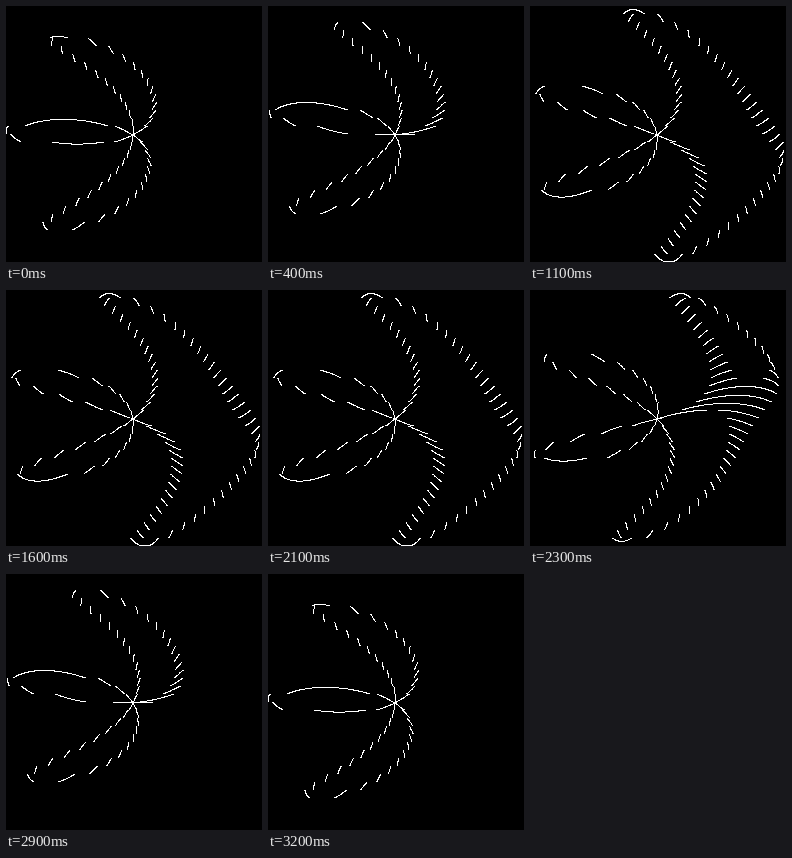
Animation of 256x256 px, one loop 3.3 s. Source, as an HTML page with a canvas:

```html
<!DOCTYPE html>
<html lang="en">
<head>
<meta charset="utf-8">
<title>Sliced rose</title>
<style>
  html, body { margin: 0; width: 100%; height: 100%; overflow: hidden; background: #000; }
  canvas { display: block; width: 100%; height: 100%; image-rendering: pixelated; }
</style>
</head>
<body>
<canvas id="stage" width="256" height="256"></canvas>
<script>
const ctx = document.getElementById('stage').getContext('2d');
const SIZE = 256, CENTER = 127, RADIUS = 128;
const BAND = 8, BANDS = SIZE / BAND;
const STEPS = 33, STEP_MS = 100;
const TURN = 6; // degrees the rose turns from one band to the next
const DOTS = 1800;
const rad = deg => deg * Math.PI / 180;

// Plots a three-petalled rose dot by dot, keeping only one band of rows
function drawBand(band, turn) {
  for (let i = 0; i < DOTS; i++) {
    const a = Math.PI * i / DOTS;
    const r = -RADIUS * Math.cos(3 * a);
    const y = SIZE - 1 - Math.trunc(CENTER + r * Math.sin(a + turn));
    if (Math.floor(y / BAND) !== band) continue;
    const x = Math.trunc(CENTER + r * Math.cos(a + turn));
    ctx.fillRect(x, y, 1, 1);
  }
}

function draw(step) {
  // The loop opens on its closing picture
  const pass = step || STEPS - 1;
  ctx.fillStyle = '#000';
  ctx.fillRect(0, 0, SIZE, SIZE);
  ctx.fillStyle = '#fff';
  for (let band = 0; band < BANDS; band++) {
    drawBand(band, rad(-TURN * (pass * BANDS + band + 1) % 360));
  }
}

let shown = -1;
function tick() {
  const step = Math.floor(performance.now() / STEP_MS) % STEPS;
  if (step !== shown) draw(shown = step);
  requestAnimationFrame(tick);
}
tick();
</script>
</body>
</html>
```
